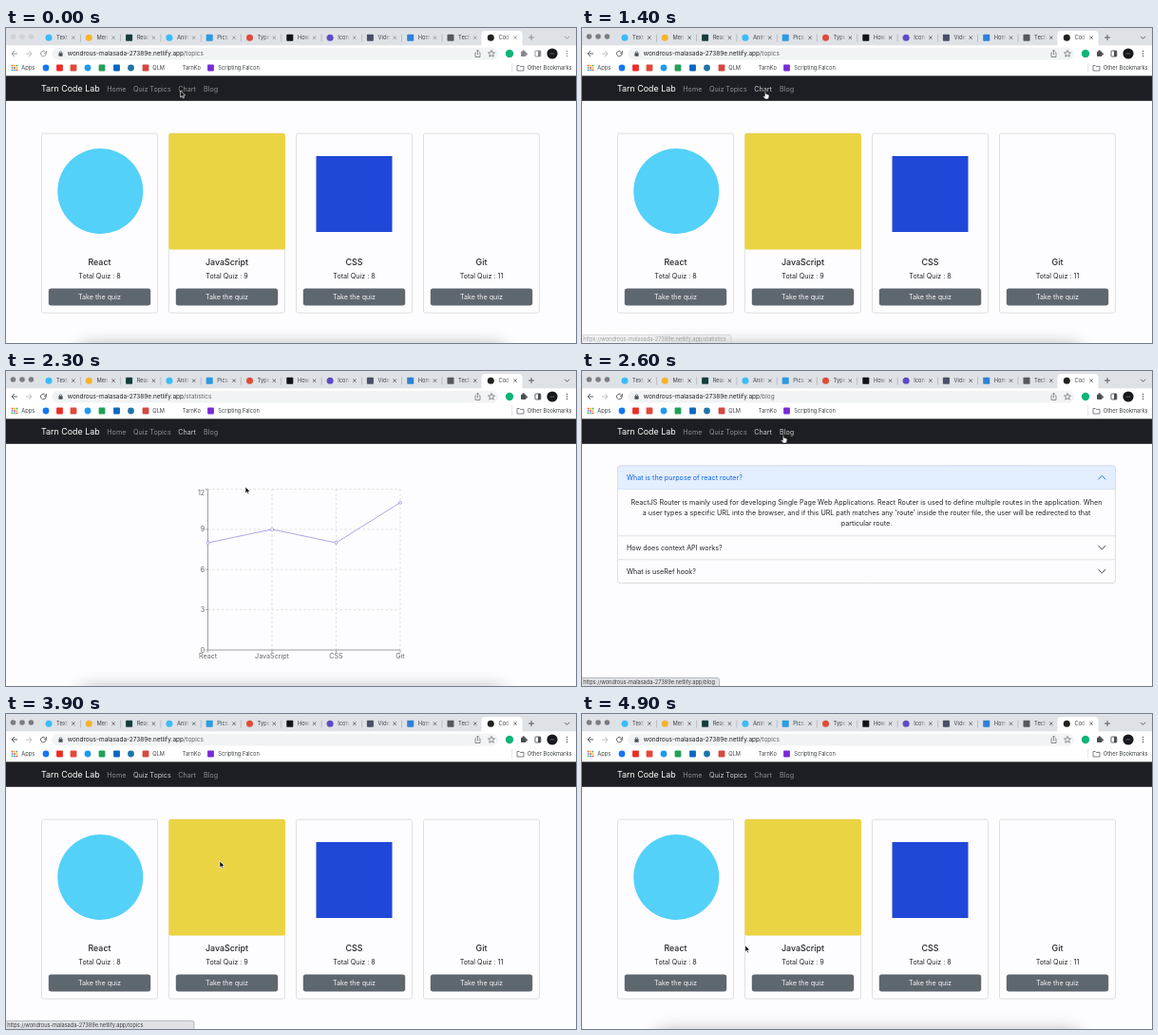
An HTML page with a canvas that plays this animation: 600 by 332 pixels, repeating every 5 s.

```html
<!DOCTYPE html>
<html lang="en">
<head>
<meta charset="utf-8">
<title>Quiz topics</title>
<style>
html, body { margin: 0; width: 100%; height: 100%; overflow: hidden; background: #fdfcfe; }
canvas { display: block; width: 600px; height: 332px; }
</style>
</head>
<body>
<canvas id="stage"></canvas>
<script>
const W = 600, H = 332, LOOP = 5000, STEP = 100;
const FONT = 'Inter, "Open Sans", sans-serif';
const HOST = 'wondrous-malasada-27389e.netlify.app';
const PAPER = '#fdfcfe';
const canvas = document.getElementById('stage');
const ctx = canvas.getContext('2d');
const dpr = window.devicePixelRatio || 1;
canvas.width = W * dpr;
canvas.height = H * dpr;

// ---------- helpers ----------
function text(str, x, y, size, color, align = 'left', weight = 400) {
  ctx.font = `${weight} ${size}px ${FONT}`;
  ctx.fillStyle = color;
  ctx.textAlign = align;
  ctx.textBaseline = 'alphabetic';
  ctx.fillText(str, x, y + size * 0.36);
  return ctx.measureText(str).width;
}

function rect(x, y, w, h, color) {
  ctx.fillStyle = color;
  ctx.fillRect(x, y, w, h);
}

function rounded(x, y, w, h, r, fill, stroke, width = 0.8) {
  ctx.beginPath();
  ctx.roundRect(x, y, w, h, r);
  if (fill) { ctx.fillStyle = fill; ctx.fill(); }
  if (stroke) { ctx.strokeStyle = stroke; ctx.lineWidth = width; ctx.stroke(); }
}

function circle(x, y, r, color) {
  ctx.beginPath();
  ctx.arc(x, y, r, 0, Math.PI * 2);
  ctx.fillStyle = color;
  ctx.fill();
}

function path(points, color, width = 1, closed = false, fill = null) {
  ctx.beginPath();
  points.forEach(([x, y], i) => i ? ctx.lineTo(x, y) : ctx.moveTo(x, y));
  if (closed) ctx.closePath();
  if (fill) { ctx.fillStyle = fill; ctx.fill(); }
  ctx.strokeStyle = color;
  ctx.lineWidth = width;
  ctx.stroke();
}

function badge(kind, x, y, r, color) {
  if (kind === 'o') circle(x, y, r, color);
  else rounded(x - r, y - r, r * 2, r * 2, 0.8, color);
}

// ---------- browser ----------
const TABS = [
  ['Text', 'o', '#38bdf8'], ['Men', 'o', '#f3b32b'], ['Reac', 's', '#123f3c'],
  ['Anim', 'o', '#38bdf8'], ['Pics', 's', '#2a9be0'], ['Type', 'o', '#df4b37'],
  ['How', 's', '#111318'], ['Icon', 'o', '#5b4bc4'], ['Vide', 's', '#4a4f66'],
  ['Hom', 's', '#2f80d8'], ['Tech', 's', '#55585c'], ['Cod', 'o', '#222222']
];
const MARKS = [
  ['o', 42, '#1877f2'], ['s', 56.5, '#ee2b24'], ['s', 71, '#e14a3b'], ['o', 86, '#1d9bf0'],
  ['s', 101, '#22a05a'], ['s', 116.5, '#0a66c2'], ['o', 131.5, '#1f74a8'], ['s', 147, '#d8473f'],
  ['s', 215.5, '#7a2bd6']
];

function drawTabs(focused, ink) {
  rect(0, 0, W, 18.5, '#dee1e6');
  [7.5, 17, 26.4].forEach(x => circle(x, 9, 2.8, focused ? '#7c7d80' : '#d0d1d4'));
  rounded(500.5, 3, 43, 16, [4, 4, 0, 0], '#ffffff');
  TABS.forEach(([name, kind, color], i) => {
    const x = 45 + i * 42.3;
    badge(kind, x, 10.2, 3.5, color);
    ctx.save();
    ctx.beginPath();
    ctx.rect(x + 7, 3, 14, 15);
    ctx.clip();
    const fade = ctx.createLinearGradient(x + 15, 0, x + 21, 0);
    fade.addColorStop(0, '#3c4043');
    fade.addColorStop(1, 'rgba(60,64,67,0.1)');
    text(name, x + 8.1, 10.2, 5.8, fade);
    ctx.restore();
    const cx = x + 25.8;
    path([[cx - 1.7, 8.5], [cx + 1.7, 11.9]], ink, 0.8);
    path([[cx + 1.7, 8.5], [cx - 1.7, 11.9]], ink, 0.8);
    if (i < 10) rect(x + 33, 6.5, 0.6, 8, '#a4a8ae');
  });
  path([[550, 10], [556, 10]], ink, 0.9);
  path([[553, 7], [553, 13]], ink, 0.9);
  path([[588, 8.8], [590.5, 11.3], [593, 8.8]], ink, 0.9);
}

function drawArrow(x, dir, color) {
  path([[x - 3, 27], [x + 3, 27]], color, 0.9);
  path([[x, 24], [x + 3 * dir, 27], [x, 30]], color, 0.9);
}

function drawStar(x, y, r) {
  const pts = Array.from({ length: 10 }, (_, i) => {
    const a = i * Math.PI / 5 - Math.PI / 2, d = i % 2 ? r * 0.45 : r;
    return [x + d * Math.cos(a), y + d * Math.sin(a)];
  });
  path(pts, '#5f6368', 0.7, true);
}

function drawToolbar(page, ink) {
  rect(0, 18.5, W, 32.5, '#ffffff');
  drawArrow(9, -1, ink);
  drawArrow(24, 1, '#b9bcc0');
  ctx.beginPath();
  ctx.arc(39.3, 27, 2.8, -0.5, Math.PI * 1.65);
  ctx.strokeStyle = ink;
  ctx.lineWidth = 0.9;
  ctx.stroke();
  path([[42.4, 23.8], [42.4, 26.2], [40, 26.2]], ink, 0.8);

  rounded(48.5, 20.8, 469.5, 12.8, 6.4, '#f1f3f4');
  rounded(55.4, 26.2, 4.2, 3.5, 0.5, '#4b4f54');
  ctx.beginPath();
  ctx.arc(57.5, 26, 1.3, Math.PI, 0);
  ctx.strokeStyle = '#4b4f54';
  ctx.lineWidth = 0.7;
  ctx.stroke();
  const w = text(HOST, 64.7, 27.1, 6.48, '#202124');
  text('/' + page, 64.7 + w, 27.1, 6.48, '#5f6368');

  path([[495, 26], [494, 26], [494, 30.5], [499, 30.5], [499, 26], [498, 26]], '#5f6368', 0.7);
  path([[496.5, 28.5], [496.5, 23.2]], '#5f6368', 0.7);
  path([[495, 24.6], [496.5, 23.1], [498, 24.6]], '#5f6368', 0.7);
  drawStar(511, 27.2, 3.7);
  circle(530, 27, 4.2, '#12b37a');
  rounded(542, 24.7, 5.4, 5.4, 0.8, ink);
  circle(544.7, 24.4, 1.2, ink);
  circle(547.7, 27.4, 1.2, ink);
  rounded(557, 24, 5.8, 6, 0.8, null, ink, 0.9);
  rect(560, 24, 2.8, 6, ink);
  circle(575, 27, 5.6, '#17181b');
  rect(572.5, 26.7, 5, 0.7, '#777777');
  [-2.4, 0, 2.4].forEach(d => circle(590.5, 27 + d, 0.75, ink));
}

function drawBookmarks() {
  const dots = ['#e94335', '#4285f4', '#34a853', '#fbbc05'];
  for (let i = 0; i < 9; i++) {
    rect(5.8 + (i % 3) * 2.4, 38.8 + Math.floor(i / 3) * 2.4, 1.6, 1.6, dots[(i * 3) % 4]);
  }
  text('Apps', 16.3, 42, 5.7, '#3c4043');
  MARKS.forEach(([kind, x, color]) => badge(kind, x, 42, 3.4, color));
  text('QLM', 154.3, 42, 5.7, '#3c4043');
  text('TarnKo', 185.8, 42, 5.7, '#3c4043');
  text('Scripting Falcon', 223.3, 42, 5.7, '#3c4043');
  rect(532.5, 37, 0.6, 10, '#d0d3d7');
  path([[538, 39.5], [540.3, 39.5], [541.2, 40.4], [545, 40.4], [545, 45], [538, 45]], '#5f6368', 0.8, true);
  text('Other Bookmarks', 548.8, 42, 5.7, '#3c4043');
}

// ---------- page ----------
function drawNav(lit) {
  rect(0, 50.4, W, 26.4, '#1d1e23');
  text('Tarn Code Lab', 37, 64, 8.9, '#ffffff');
  [['Home', 106.3], ['Quiz Topics', 134], ['Chart', 181.3], ['Blog', 208]].forEach(([name, x]) =>
    text(name, x, 64, 7.15, lit.includes(name) ? '#cdcecf' : '#8f9093'));
}

function drawTopics() {
  const cards = [['React', 8], ['JavaScript', 9], ['CSS', 8], ['Git', 11]];
  cards.forEach(([name, total], i) => {
    const x = 37.5 + i * 134, mid = x + 61;
    rounded(x, 111.2, 122, 189, 2, PAPER, '#d9d9da');
    if (i === 0) circle(99.3, 172, 45, '#53d1f9');
    if (i === 1) rounded(x - 0.1, 111, 122.6, 122.4, 2, '#ebd443');
    if (i === 2) rect(326.5, 135, 80, 80, '#2048d8');
    text(name, mid, 246.6, 8.9, '#212529', 'center', 500);
    text('Total Quiz : ' + total, mid, 261.5, 7.15, '#212529', 'center');
    rounded(x + 7.3, 274.5, 107.4, 18, 2.7, '#5f676e');
    text('Take the quiz', mid, 283.6, 7.15, '#f4f5f6', 'center');
  });
}

function drawChart(t) {
  const px = i => 212.5 + i * 67.5;
  const py = v => 294 - v * 14.12;
  ctx.setLineDash([2.4, 2.4]);
  for (let i = 1; i < 4; i++) path([[px(i), py(12)], [px(i), py(0)]], '#cfcfcf', 0.6);
  for (let v = 3; v <= 12; v += 3) path([[px(0), py(v)], [px(3), py(v)]], '#cfcfcf', 0.6);
  ctx.setLineDash([]);

  path([[px(0), py(12)], [px(0), py(0)], [px(3), py(0)]], '#777777', 0.7);
  for (let v = 0; v <= 12; v += 3) {
    path([[px(0) - 2.8, py(v)], [px(0), py(v)]], '#777777', 0.6);
    text(String(v), 209.2, v === 12 ? 128 : py(v), 7.15, '#666666', 'right');
  }
  ['React', 'JavaScript', 'CSS', 'Git'].forEach((name, i) => {
    path([[px(i), py(0)], [px(i), py(0) + 2.8]], '#777777', 0.6);
    text(name, px(i), 300.2, 7.15, '#666666', 'center');
  });

  const p = Math.min(1, (t - 1500) / 500);
  if (p <= 0) return;
  const points = [8, 9, 8, 11].map((v, i) => [px(i), py(v)]);
  ctx.save();
  ctx.beginPath();
  ctx.rect(px(0) - 3, 110, 3 + 206 * p * (2 - p), 190);
  ctx.clip();
  path(points, '#8884d8', 0.7);
  ctx.restore();
  if (p === 1) points.forEach(([x, y]) => {
    circle(x, y, 1.7, '#8884d8');
    circle(x, y, 1.1, '#ffffff');
  });
}

function drawBlog() {
  const answer = [
    'ReactJS Router is mainly used for developing Single Page Web Applications. React Router is used to define multiple routes in the application. When',
    "a user types a specific URL into the browser, and if this URL path matches any 'route' inside the router file, the user will be redirected to that",
    'particular route.'
  ];
  rounded(37.5, 99.8, 524, 123.7, 2.5, PAPER, '#d6d7d9');
  rounded(37.5, 99.8, 524, 24.7, [2.5, 2.5, 0, 0], '#e3eefe', '#c9d8ec', 0.6);
  [173.5, 198.5].forEach(y => rect(37.5, y, 524, 0.7, '#d6d7d9'));
  text('What is the purpose of react router?', 47, 112.3, 7.15, '#0c63e4');
  answer.forEach((line, i) => text(line, 299.5, 138.2 + i * 11.3, 7.15, '#212529', 'center'));
  text('How does context API works?', 47, 186, 7.15, '#212529');
  text('What is useRef hook?', 47, 211, 7.15, '#212529');
  [[112.3, -1, '#0c63e4'], [186, 1, '#212529'], [211, 1, '#212529']].forEach(([y, d, color]) =>
    path([[543.4, y - 1.9 * d], [547.3, y + 1.9 * d], [551.2, y - 1.9 * d]], color, 0.9));
}

function drawShadow() {
  ctx.save();
  ctx.shadowColor = 'rgba(0,0,0,0.3)';
  ctx.shadowBlur = 18 * dpr;
  rect(80, 334, 442, 20, '#888888');
  ctx.restore();
}

function drawStatus(page, width, alpha) {
  ctx.globalAlpha = alpha;
  rounded(-1, 323.4, width + 1, 10, [0, 2, 0, 0], '#dfe1e5', '#a9adb2');
  text(`https://${HOST}/${page}`, 1.2, 328, 5.62, '#3c4043');
  ctx.globalAlpha = 1;
}

// ---------- pointer ----------
const MOVES = [
  [0, 183.7, 66], [1000, 186, 66], [1300, 193, 67], [1600, 193, 67], [1800, 230, 110],
  [2100, 290, 170], [2500, 214, 74], [2600, 212, 68], [3500, 212, 68], [3700, 172, 69],
  [3800, 162, 68], [3900, 225, 155], [4300, 244, 172], [4800, 206, 148], [4900, 171.7, 243.7]
];

function pointerAt(t) {
  const i = MOVES.findIndex(m => m[0] > t);
  if (i < 0) return MOVES[MOVES.length - 1].slice(1);
  const [t0, x0, y0] = MOVES[i - 1], [t1, x1, y1] = MOVES[i];
  const p = (t - t0) / (t1 - t0), e = p * p * (3 - 2 * p);
  return [x0 + (x1 - x0) * e, y0 + (y1 - y0) * e];
}

function drawPointer(t) {
  const hand = (t >= 1300 && t < 1700) || (t >= 2600 && t < 3900);
  const [x, y] = pointerAt(t);
  ctx.save();
  ctx.translate(x, y);
  ctx.lineJoin = 'round';
  if (hand) {
    ctx.translate(0, -0.6);
    path([[-0.8, 0.2], [0.6, 0.2], [0.9, 3.1], [2.8, 3.4], [4.2, 4.3], [3.9, 6.8], [3, 8.7],
      [-0.3, 8.7], [-2.7, 5.8], [-2.2, 4.9], [-0.8, 5.8]], '#111111', 0.8, true, '#ffffff');
  } else {
    path([[0, 0], [0, 7], [1.6, 5.6], [2.7, 8], [3.8, 7.5], [2.8, 5.2], [4.9, 5]],
      '#ffffff', 0.7, true, '#000000');
  }
  ctx.restore();
}

// ---------- timeline ----------
const between = (t, a, b) => t >= a && t < b;

function litLinks(t) {
  if (between(t, 1300, 2600)) return ['Chart'];
  if (between(t, 2600, 2700)) return ['Chart', 'Blog'];
  if (between(t, 2700, 3700)) return ['Blog'];
  return t >= 3700 ? ['Quiz Topics'] : [];
}

function draw(t) {
  const page = between(t, 1500, 2600) ? 'statistics' : between(t, 2600, 3900) ? 'blog' : 'topics';
  const focused = t >= 300;
  const ink = focused ? '#4b4f54' : '#85898e';
  ctx.setTransform(dpr, 0, 0, dpr, 0, 0);
  rect(0, 0, W, H, PAPER);
  drawTabs(focused, ink);
  drawToolbar(page, ink);
  drawBookmarks();
  drawNav(litLinks(t));
  if (page === 'topics') drawTopics();
  else if (page === 'blog') drawBlog();
  else drawChart(t);

  if (t < 1500 || between(t, 1900, 2500) || t >= 4200) drawShadow();
  if (between(t, 1400, 1800)) drawStatus('statistics', 157, t < 1500 ? 0.45 : 1);
  else if (between(t, 2500, 3700)) drawStatus('blog', 144.5, t < 2600 ? 0.45 : 1);
  else if (between(t, 3700, 4400)) drawStatus('topics', t < 3900 ? 148 : 198, t < 4300 ? 1 : 0.5);
  drawPointer(t);
}

const start = performance.now();
function tick() {
  const t = (performance.now() - start) % LOOP;
  draw(Math.floor(t / STEP) * STEP);
  requestAnimationFrame(tick);
}
tick();
</script>
</body>
</html>
```
